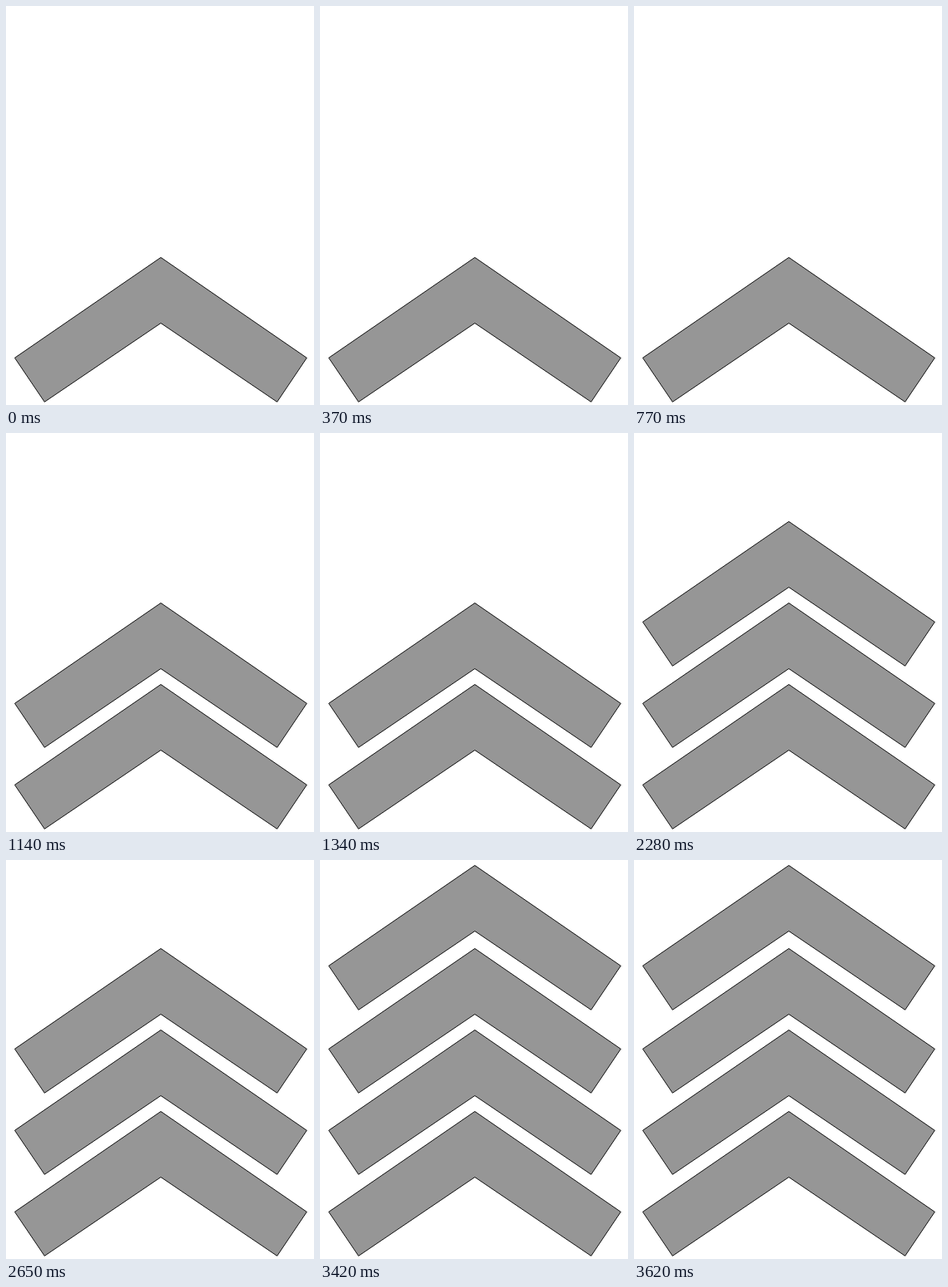
Animation, 370 px wide and 480 px high, one loop 4530 ms. Source, as an HTML page:

```html
<!DOCTYPE html>
<html lang="en">
<head>
<meta charset="utf-8">
<title>Rising chevrons</title>
<style>
  html, body { margin: 0; width: 100%; height: 100%; overflow: hidden; background: #fff; }
  svg { display: block; }
</style>
</head>
<body>
<svg width="370" height="480" viewBox="0 0 370 480">
  <defs>
    <path id="chevron" d="M186 302.5 361.3 423.3 325.7 476.3 186 381.5 46.3 476.3 10.5 423.3Z"
      fill="#969696" stroke="#111" stroke-width="1" stroke-linejoin="round"/>
  </defs>
  <use href="#chevron"/>
  <use href="#chevron" y="-98"/>
  <use href="#chevron" y="-196"/>
  <use href="#chevron" y="-296"/>
</svg>
<script>
  const LOOP = 4530, STEP = 1140;
  const chevrons = document.querySelectorAll('use');
  const start = performance.now();

  function draw() {
    const time = (performance.now() - start) % LOOP;
    chevrons.forEach((chevron, i) => {
      chevron.style.visibility = time >= i * STEP ? 'visible' : 'hidden';
    });
    requestAnimationFrame(draw);
  }
  draw();
</script>
</body>
</html>
```
